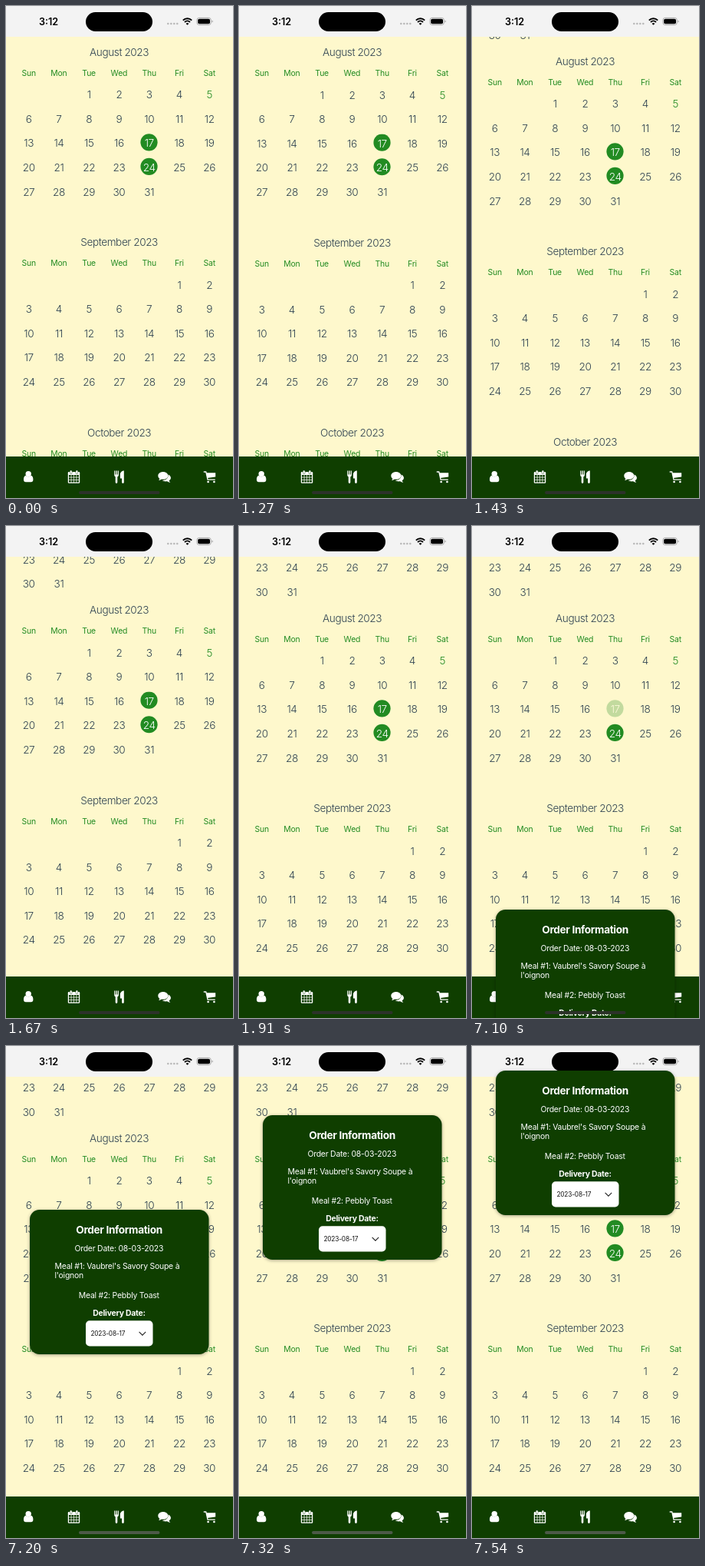
An HTML page that plays this animation: 296x640 px, repeating every 8 s.

```html
<!DOCTYPE html>
<html lang="en">
<head>
<meta charset="utf-8">
<title>Meal calendar</title>
<style>
  html, body { margin: 0; width: 100%; height: 100%; overflow: hidden; background: #fef8cc; }
  svg { display: block; width: 296px; height: 640px; }
  text { font-family: Inter, Roboto, "Liberation Sans", sans-serif; white-space: pre; }
  .mid { text-anchor: middle; }
  .day, .month { font-size: 13.6px; font-weight: 300; letter-spacing: -.03em; fill: #2d4150; }
  .week { font-size: 10.4px; letter-spacing: -.015em; fill: #228b22; }
  .today { fill: #228b22; }
  .picked { fill: #fff; }
  .clock { font-size: 12.6px; font-weight: 600; }
  .head { font-size: 13.6px; font-weight: 700; letter-spacing: -.025em; fill: #fff; }
  .line { font-size: 10.4px; letter-spacing: -.02em; fill: #fff; }
  .bold { font-weight: 700; }
  .date { font-size: 8.3px; letter-spacing: -.02em; fill: #111; }
  #modal { filter: drop-shadow(0 1px 2px rgba(0, 0, 0, .35)); }
</style>
</head>
<body>
<svg viewBox="0 0 296 640">
  <defs>
    <clipPath id="view"><rect y="40" width="296" height="546"/></clipPath>
  </defs>
  <rect width="296" height="640" fill="#fef8cc"/>
  <g clip-path="url(#view)"><g id="list"></g></g>

  <g id="status">
    <rect width="296" height="40" fill="#f3f3f3"/>
    <text class="clock mid" x="55.5" y="24.5">3:12</text>
    <rect x="104" y="8" width="87" height="25" rx="12.5"/>
    <g fill="#b9b9b9">
      <circle cx="211.3" cy="23" r="1.3"/><circle cx="215.3" cy="23" r="1.3"/>
      <circle cx="219.3" cy="23" r="1.3"/><circle cx="223.3" cy="23" r="1.3"/>
    </g>
    <g fill="none" stroke="#000" stroke-width="1.9">
      <path d="M230.8 18.6a8 8 0 0 1 11.4 0M233 21a5 5 0 0 1 7 0"/>
    </g>
    <path d="M236.5 24.8l-1.9-1.9a2.7 2.7 0 0 1 3.8 0z"/>
    <rect x="248.9" y="15.4" width="18.4" height="9.2" rx="2.9" fill="none" stroke="#999" stroke-width=".8"/>
    <rect x="250.2" y="16.7" width="15.8" height="6.6" rx="1.8"/>
    <path d="M268.6 18.4a1.7 1.7 0 0 1 0 3.2z" fill="#999"/>
  </g>

  <g id="tabs" fill="#fff">
    <rect y="586" width="296" height="54" fill="#0f3e00"/>
    <circle cx="29.2" cy="608.7" r="3.7"/>
    <path d="M25.6 610.8c-2 .4-2.6 3-2.6 5.4 0 1.8 1.1 3 2.7 3h7c1.6 0 2.7-1.2 2.7-3 0-2.4-.6-5-2.6-5.4a5 5 0 0 1-7.2 0z"/>
    <g id="cal">
      <rect x="80.8" y="606" width="15.4" height="14.8" rx="1.2"/>
    </g>
    <path d="M141.2 604.6h1.2v4.8h1v-4.8h1.3v4.8h1v-4.8h1.2v5.6q0 1.6-1.6 2.2v7.2a1.3 1.3 0 0 1-2.6 0v-7.2q-1.5-.6-1.5-2.2z"/>
    <path d="M153.8 604.4c-2.6 0-4.9 2.2-4.9 4.8v5.2h2.2v5.2a1.35 1.35 0 0 0 2.7 0z"/>
    <path d="M211.5 609.5c4.4 2 4.4 6 1.1 7.9.3 1 1 1.6 1.7 2.3-1.8.1-3-.5-4.2-1.4-2.6.4-5-.1-6.6-1.2 4.8 0 8.5-3 8-7.6z"/>
    <path d="M204.8 606c3.7 0 6.5 2.2 6.5 4.9s-2.8 4.9-6.5 4.9q-.9 0-1.7-.2c-1.2.9-2.6 1.5-4.2 1.5.7-.6 1.3-1.3 1.5-2.2-1.3-.9-2.1-2.3-2.1-4 0-2.7 2.8-4.9 6.5-4.9z"/>
    <path d="M261.2 607.2h12v5.4l-10.6 1.3z"/>
    <path d="M258.2 606h2.6l2.2 10.2h9.2" fill="none" stroke="#fff" stroke-width="1.3" stroke-linejoin="round" stroke-linecap="round"/>
    <circle cx="263.6" cy="619" r="1.35"/><circle cx="271.4" cy="619" r="1.35"/>
  </g>

  <g id="modal">
    <rect x="31" width="233.5" height="188" rx="12.5" fill="#0f3e00"/>
    <text class="head mid" x="147.6" y="31">Order Information</text>
    <text class="line mid" x="147.3" y="54.3">Order Date: 08-03-2023</text>
    <text class="line" x="63.5" y="77">Meal #1: Vaubrel's Savory Soupe à</text>
    <text class="line" x="63.5" y="89.3">l'oignon</text>
    <text class="line mid" x="147.3" y="115.3">Meal #2: Pebbly Toast</text>
    <text class="line bold mid" x="147.5" y="138">Delivery Date:</text>
    <rect x="104" y="144.2" width="87.5" height="33.3" rx="5" fill="#fff"/>
    <text class="date" x="110.4" y="164">2023-08-17</text>
    <path d="M173.6 158.8l4.3 4.3 4.3-4.3" fill="none" stroke="#222" stroke-width="1.1"/>
  </g>
  <rect id="home" x="95" y="631" width="105.5" height="4" rx="2"/>
</svg>
<script>
const LOOP = 8000;
const COL = 39.25, ROW = 31.55, MONTH = 247.3;
const $ = id => document.getElementById(id);

function add(parent, tag, attrs, text) {
  const el = document.createElementNS('http://www.w3.org/2000/svg', tag);
  for (const key in attrs) el.setAttribute(key, attrs[key]);
  if (text !== undefined) el.textContent = text;
  return parent.appendChild(el);
}
const colX = c => 29.7 + c * COL;

function drawMonth(name, index, top, picked = [], today) {
  const list = $('list');
  const first = new Date(2023, index, 1).getDay();
  const count = new Date(2023, index + 1, 0).getDate();
  add(list, 'text', { class: 'month mid', x: 147.6, y: top + 5 }, name + ' 2023');
  ['Sun', 'Mon', 'Tue', 'Wed', 'Thu', 'Fri', 'Sat'].forEach((w, c) =>
    add(list, 'text', { class: 'week mid', x: colX(c), y: top + 30.9 }, w));
  for (let d = 1; d <= count; d++) {
    const cell = first + d - 1;
    const x = colX(cell % 7), y = top + 55.4 + Math.floor(cell / 7) * ROW;
    const on = picked.includes(d);
    const g = on ? add(list, 'g', { id: 'day' + d }) : list;
    if (on) add(g, 'circle', { cx: x - .2, cy: y - 1.2, r: 11.1, fill: '#228b22' });
    const kind = on ? ' picked' : d === today ? ' today' : '';
    add(g, 'text', { class: 'day mid' + kind, x, y: y + 4.9 }, d);
  }
}
drawMonth('July', 6, 60 - MONTH);
drawMonth('August', 7, 60, [17, 24], 5);
drawMonth('September', 8, 60 + MONTH);
drawMonth('October', 9, 60 + 2 * MONTH);

// calendar icon: rings and day cells
for (const x of [83.4, 91]) {
  add($('cal'), 'rect', { x, y: 604, width: 2.7, height: 4.6, rx: 1.2, stroke: '#0f3e00', 'stroke-width': .5 });
}
for (let i = 0; i < 12; i++) {
  add($('cal'), 'rect', {
    x: 82 + (i % 4) * 3.4, y: 610 + Math.floor(i / 4) * 3.4,
    width: 2.7, height: 2.7, fill: '#0f3e00'
  });
}

// each step is [time, value] and holds until the next one
function play(el, prop, steps, format = v => v) {
  const frames = steps.map(([t, v]) => ({ offset: t / LOOP, [prop]: format(v), easing: 'step-end' }));
  frames.push({ ...frames[frames.length - 1], offset: 1 });
  return el.animate(frames, { duration: LOOP, iterations: Infinity });
}
const shift = y => `translateY(${y}px)`;

const runs = [
  play($('list'), 'transform',
    [[0, 0], [1270, .4], [1430, 12], [1550, 36], [1670, 49.4], [1800, 57], [1910, 60]], shift),
  play($('day17'), 'opacity',
    [[0, 1], [2760, .2], [7100, .27], [7200, .6], [7320, .92], [7430, 1]]),
  play($('modal'), 'transform',
    [[0, 660], [7100, 499], [7200, 213], [7320, 90], [7430, 48], [7540, 32]], shift),
  play($('home'), 'fill',
    [[0, '#2c3229'], [7200, '#4c5947']])
];
const start = document.timeline.currentTime || 0;
runs.forEach(run => run.startTime = start);
</script>
</body>
</html>
```
